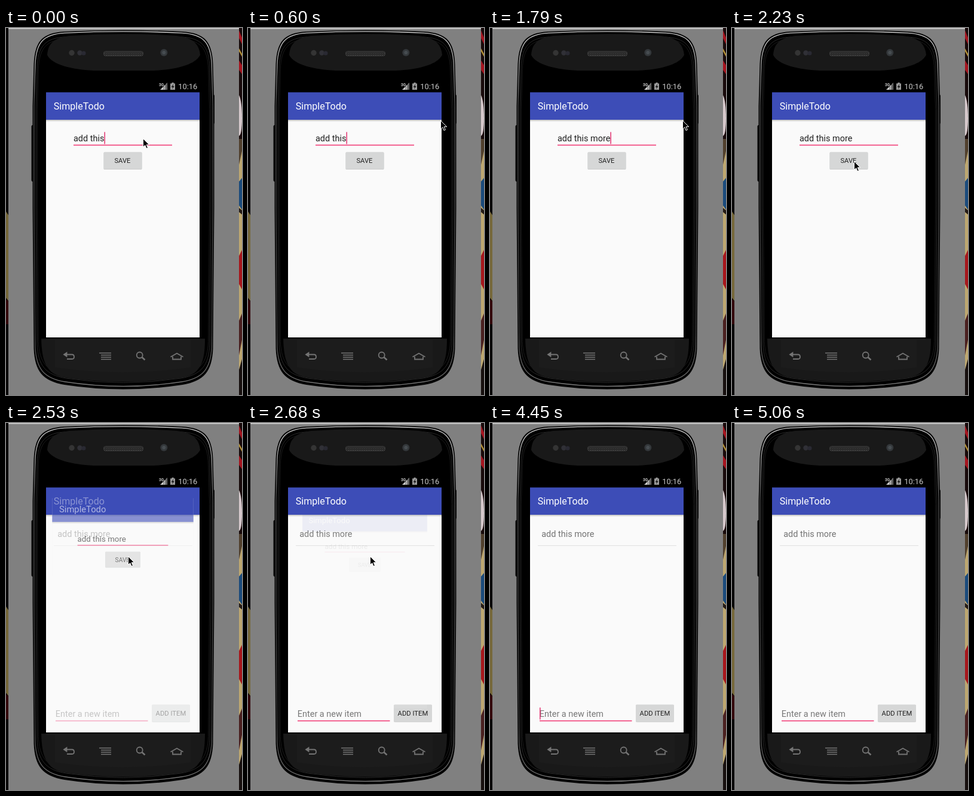
An HTML page for the animation above (5.16 s loop, 395 by 612 pixels).

```html
<!DOCTYPE html>
<html lang="en">
<head>
<meta charset="utf-8">
<title>Todo demo</title>
<style>
html, body { margin: 0; width: 100%; height: 100%; overflow: hidden; background: #808080; }
svg { display: block; width: 395px; height: 612px; }
text { font-family: Roboto, "Noto Sans", sans-serif; font-size: 14.46px; white-space: pre; }
.label { font-size: 11.24px; fill: #202020; }
.line { fill: #f2487f; }
.caret { fill: #e33e78; }
.nav { fill: none; stroke: #747474; stroke-width: 1.8; }
</style>
</head>
<body>
<svg viewBox="0 0 395 612">
  <defs>
    <linearGradient id="rim" x2="0" y2="1">
      <stop offset="0" stop-color="#d0d0d0"/><stop offset=".08" stop-color="#a0a0a0"/>
      <stop offset=".2" stop-color="#4c4c4c"/><stop offset=".85" stop-color="#3c3c3c"/><stop offset="1" stop-color="#777"/>
    </linearGradient>
    <linearGradient id="shade" x2="0" y2="1">
      <stop offset="0" stop-opacity=".24"/><stop offset="1" stop-opacity="0"/>
    </linearGradient>
    <pattern id="mesh" width="3" height="3" patternUnits="userSpaceOnUse">
      <rect width="3" height="3" fill="#151515"/>
      <path d="M0 3 3 0M0 0 3 3" stroke="#505050" stroke-width=".7"/>
    </pattern>
    <path id="body" d="M47.500 60C49 22 62 9 97 7Q196 2 295 7C331 9 344 22 345.500 60L347.500 130V300L345.500 535C344 572 331 588 295 594Q196 609 98 594C62 588 49 572 47.500 535L45.500 300V130Z"/>
    <g id="appbar">
      <rect x="67" y="110" width="257" height="406" fill="#fafafa"/>
      <rect x="67" y="153" width="257" height="3.500" fill="url(#shade)"/>
      <rect x="67" y="107.500" width="257" height="45.500" fill="#3d4db7"/>
      <text x="79.800" y="136" fill="#fff" style="font-size:16.06px">SimpleTodo</text>
    </g>
    <g id="button">
      <rect y=".6" width="64" height="28.600" rx="1.600" fill="#c8c9c9"/>
      <rect width="64" height="28.500" rx="1.600" fill="#d6d7d7"/>
    </g>
  </defs>

  <!-- desktop -->
  <rect width="395" height="612" fill="#808080"/>
  <rect x="4" width="386" height="1.600" fill="#d2d2d2"/>
  <g>
    <rect width="4" height="612" fill="#080607"/>
    <path d="M0 306 4 312V455L0 450Z" fill="#76683a"/>
    <path d="M0 452 4 456V494H0Z" fill="#33080c"/>
  </g>
  <g>
    <rect x="390" width="5" height="612" fill="#bda770"/>
    <rect x="390" width="5" height="185" fill="#180a0b"/>
    <path d="M390 4 395 16V27L390 17ZM390 54 395 62V77L390 70Z" fill="#a51520"/>
    <path d="M390 34 395 43V48L390 39Z" fill="#b69336"/>
    <path d="M390 112Q395 122 395 150T390 180Z" fill="#d6c9cc"/>
    <path d="M390 185H395V205L390 228Z" fill="#51402d"/>
    <path d="M390 256 395 250V303L390 296Z" fill="#1b4b7c"/>
    <path d="M390 300 395 304V311L390 307Z" fill="#241b16"/>
    <path d="M390 380 395 370V436L390 427Z" fill="#a6171d"/>
    <path d="M390 488 395 476V520L390 546Z" fill="#4a2020"/>
    <path d="M390 570 395 552V612H390Z" fill="#17100f"/>
  </g>

  <!-- handset -->
  <rect x="42.500" y="162" width="6" height="94" rx="2" fill="#090909"/>
  <rect x="343" y="111" width="6" height="49" rx="2" fill="#090909"/>
  <use href="#body" fill="#000" stroke="#050505" stroke-width="2"/>
  <use href="#body" fill="#000" stroke="url(#rim)" stroke-width="1.400" transform="translate(1.800 1.400) scale(.991)"/>
  <use href="#body" fill="none" stroke="#2c2c2c" transform="translate(5.900 8) scale(.970)"/>
  <use href="#body" fill="none" stroke="#1e1e1e" transform="translate(8.800 11.500) scale(.955)"/>
  <path d="M69 45C70 25 82 16 106 13Q196 7 286 13C311 16 323 25 325 45C317 61 286 69 248 71H146C108 69 77 61 69 45Z" fill="#191919"/>
  <path d="M59 518H333C333 556 326 577 296 583Q196 597 98 583C67 577 60 556 59 518Z" fill="#191919"/>
  <path d="M82 520H309V566Q196 582 82 566Z" fill="#1c1c1c"/>
  <rect x="163.500" y="39" width="66" height="7.500" rx="3" fill="url(#mesh)" stroke="#3c3c3c"/>
  <circle cx="110" cy="41.500" r="4.700" fill="#343434"/>
  <circle cx="123.500" cy="41.500" r="4.200" fill="#303036"/>
  <circle cx="130" cy="42" r="3.600" fill="#292932"/>
  <circle cx="264.300" cy="41" r="6" fill="#34383b"/>
  <circle cx="264.300" cy="41" r="3" fill="#474d51"/>
  <g class="nav">
    <path d="M98 544.500H110.500Q114 544.500 114 548.300T110.500 552H102"/>
    <path d="M101.500 541.500 97 544.500 101.500 547.500Z" fill="#747474"/>
    <path d="M156 542H176M159 545.500H176M159 549H176M159 552.500H176" stroke-width="1.500"/>
    <circle cx="223.700" cy="545.500" r="5"/>
    <path d="M227.500 549 232.500 553.500" stroke-width="2.600"/>
    <path d="M275.500 548.500 286 542.500 296.500 548.500M279 548V552.500H293V548"/>
  </g>

  <!-- status bar -->
  <rect x="66" y="88" width="259" height="429" fill="#000"/>
  <g fill="#c9c9c9">
    <text x="256" y="96.500" style="font-size:6.500px;font-weight:700">3G</text>
    <path d="M258 103 264 97V103Z"/>
    <path d="M264.600 96.500 267 94V103H264.600Z"/>
    <path d="M267.800 93.200 270 91V103H267.800Z" fill="#777"/>
    <path d="M277.500 91H280.700V92.500H283V103H275V92.500H277.500Z" fill="#9a9a9a"/>
    <path d="M280.500 93.500 276.500 98.500H279L277.800 102 281.700 97H279.300Z" fill="#111"/>
    <text x="288.300" y="102" style="font-size:12.850px">10:16</text>
  </g>

  <!-- list screen -->
  <use href="#appbar"/>
  <text x="86.200" y="190" fill="#737373">add this more</text>
  <rect x="80" y="204" width="232" height="1" fill="#e1e1e1"/>
  <text x="82.800" y="490" fill="#777">Enter a new item</text>
  <rect class="line" x="83" y="495.800" width="154.500" height="1.700"/>
  <rect id="listCaret" class="caret" x="83" y="474.500" width="1.600" height="20"/>
  <use href="#button" x="244" y="469.500"/>
  <text class="label" x="250.600" y="488.300">ADD ITEM</text>

  <!-- edit screen -->
  <g id="editor">
    <use href="#appbar"/>
    <text id="entry" x="113" y="189" fill="#222"></text>
    <rect class="line" x="113" y="194.500" width="165" height="1.700"/>
    <rect id="editCaret" class="caret" y="173.500" width="1.600" height="20"/>
    <use href="#button" x="163.500" y="206.800"/>
    <text class="label" x="181.400" y="225.400">SAVE</text>
  </g>

  <path id="pointer" d="M.5.5V14.500L3.800 11.500 6 16.800 8.400 15.800 6.200 10.700H10.700Z" fill="#000" stroke="#fff" stroke-width="1"/>
</svg>
<script>
const LOOP = 5160;
const el = id => document.getElementById(id);
const [editor, entry, editCaret, listCaret, pointer] =
  ["editor", "entry", "editCaret", "listCaret", "pointer"].map(el);

// Each track holds its value until the next time.
const pointerTrack = [
  [0, [229, 184]], [150, [240, 174]], [300, [280, 146]], [450, [310, 134]], [600, [322, 154]],
  [1800, [285, 186]], [1930, [235, 214]], [2080, [207, 221]], [2230, [204, 222]],
  [2970, [311, 238]], [3120, [311, 330]], [3270, [311, 415]],
  [3570, [253, 556]], [3720, [236, 574]], [3860, [228, 580]], [4160, null]
];
const textTrack = [
  [0, "add this"], [900, "add this "], [1200, "add this m"],
  [1350, "add this mo"], [1500, "add this mor"], [1650, "add this more"]
];
const editCaretTrack = [[0, 1], [150, 0], [600, 1], [2230, 0]];
const listCaretTrack = [[0, 0], [2820, 1], [2970, 0], [3570, 1], [4010, 0], [4450, 1], [5060, 0]];
const closeTrack = [[0, 0], [2530, .4], [2680, .935], [2820, 1]];

const at = (track, t) => track.findLast(([time]) => time <= t)[1];
const show = (node, on) => node.setAttribute("visibility", on ? "visible" : "hidden");

function draw(t) {
  const text = at(textTrack, t);
  if (entry.textContent !== text) entry.textContent = text;
  editCaret.setAttribute("x", 113 + entry.getComputedTextLength());
  show(editCaret, at(editCaretTrack, t));
  show(listCaret, at(listCaretTrack, t));

  const closing = at(closeTrack, t);
  editor.setAttribute("opacity", 1 - closing);
  editor.setAttribute("transform",
    `translate(195.5 302) scale(${1 - .2 * closing}) translate(-195.5 -302)`);

  const spot = at(pointerTrack, t);
  show(pointer, spot);
  if (spot) pointer.setAttribute("transform", `translate(${spot})`);
}

const start = performance.now();
function tick() {
  draw((performance.now() - start) % LOOP);
  requestAnimationFrame(tick);
}
tick();
</script>
</body>
</html>
```
